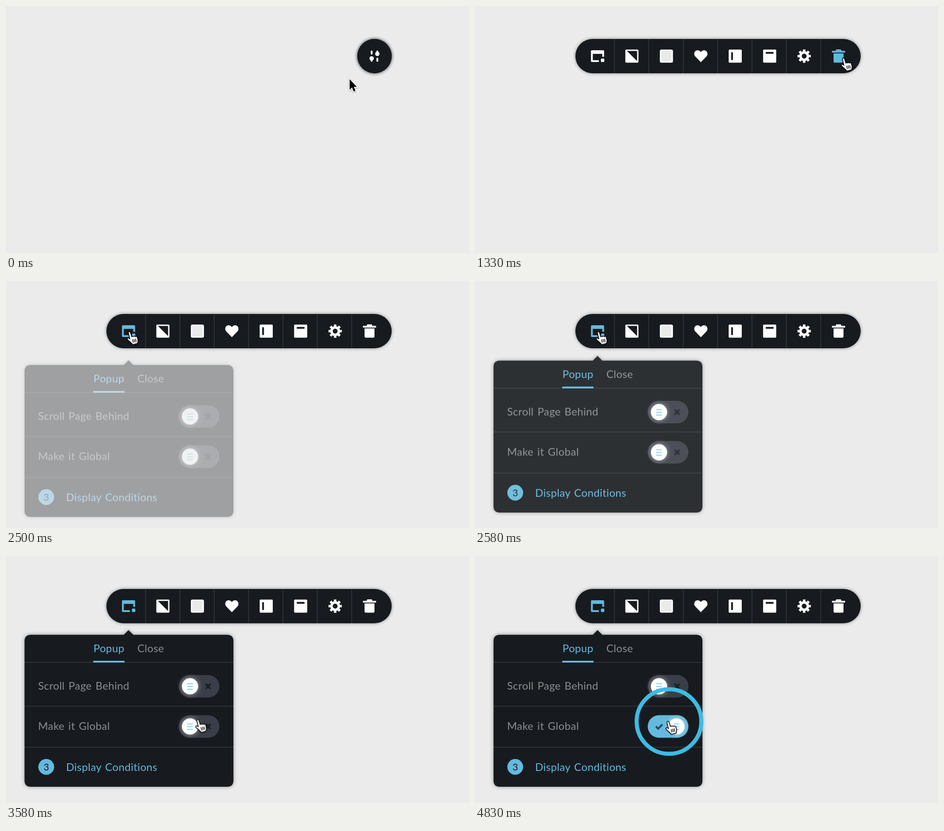
These frames come from a looping animation (1024x547 px, 5000 ms). An HTML page:

```html
<!DOCTYPE html>
<html lang="en">
<head>
<meta charset="utf-8">
<title>Popup toolbar</title>
<style>
  :root { --dark: #171b1f; --blue: #64b9de; --line: #363a3e; --grey: #8b8d8f; }
  html, body { margin: 0; width: 100%; height: 100%; overflow: hidden; background: #ebebeb; }
  .stage { position: relative; width: 1024px; height: 547px; overflow: hidden; }
  svg { position: absolute; left: 0; top: 0; overflow: visible; }
  .stage, .stage * { animation: 0s linear infinite; animation-duration: 5s; }

  /* toolbar */
  .bar, .fab {
    position: absolute; right: 171px; top: 73px; width: 76px; height: 76px;
    border-radius: 38px; background: var(--dark); box-shadow: 0 0 7px rgba(0, 0, 0, .45);
  }
  .bar { overflow: hidden; animation-name: expand; }
  .bar svg { overflow: hidden; }
  .fab { color: #fff; animation-name: fab; }
  .fab svg { animation-name: fab-hover; }
  .icon { color: #fff; fill: currentColor; }
  .pass { animation-name: pass; animation-delay: calc(var(--t) - 5s); }
  .trash { animation-name: trash; }
  .window { animation-name: window; }
  .heart { animation-name: heart; }
  .cut { fill: var(--dark); }

  @keyframes expand {
    0%, 19.15% { width: 76px; }
    19.16% { width: 495px; animation-timing-function: ease-out; }
    22.5%, 100% { width: 631px; }
  }
  @keyframes fab {
    0%, 19.15% { opacity: 1; }
    19.16% { opacity: .8; }
    21.5%, 100% { opacity: 0; }
  }
  @keyframes fab-hover { 0%, 6% { color: #fff; } 8%, 100% { color: var(--blue); } }
  @keyframes pass {
    0%, .9% { color: #fff; }
    1.5%, 2% { color: var(--blue); }
    3.2%, 100% { color: #fff; }
  }
  @keyframes trash {
    0%, 20% { color: #fff; }
    22%, 30.7% { color: var(--blue); }
    32.7%, 100% { color: #fff; }
  }
  @keyframes window { 0%, 39.4% { color: #fff; } 41%, 100% { color: var(--blue); } }
  @keyframes heart { 0%, 19.16% { opacity: .36; } 22%, 100% { opacity: 1; } }

  /* panel */
  .panel { filter: drop-shadow(0 0 4px rgba(0, 0, 0, .4)); animation-name: panel; }
  .panel text { font: 23.5px Lato, sans-serif; letter-spacing: .4px; word-spacing: 2px; fill: var(--grey); }
  .panel .on { fill: var(--blue); }
  .panel .count { font-size: 21px; letter-spacing: 0; text-anchor: middle; fill: var(--dark); }
  .rule { stroke: var(--line); stroke-width: 1.5; }
  .track { fill: #3a3e48; }
  .knob { filter: drop-shadow(0 0 6px rgba(255, 255, 255, .5)); }
  .cross { stroke: #1c2024; stroke-width: 4; }
  .check { fill: none; stroke: #2d4552; stroke-width: 4; opacity: 0; }
  .flip .track { animation-name: track; }
  .flip .knob { animation-name: knob; }
  .flip .cross { animation-name: cross; }
  .flip .check { animation-name: check; }
  .ring { fill: none; stroke: #3dbbe3; stroke-width: 9; animation-name: ring; }

  @keyframes panel {
    0%, 49.99% { opacity: 0; transform: translateY(18px); }
    50% { opacity: .36; transform: translateY(11.5px); animation-timing-function: ease-out; }
    52.5%, 100% { opacity: 1; transform: none; }
  }
  @keyframes track { 0%, 85.82% { fill: #3a3e48; } 85.83%, 100% { fill: var(--blue); } }
  @keyframes cross { 0%, 85.82% { opacity: 1; } 85.83%, 100% { opacity: 0; } }
  @keyframes knob {
    0%, 85.82% { transform: translateX(0); }
    85.83% { transform: translateX(5.5px); animation-timing-function: ease-out; }
    88.6%, 100% { transform: translateX(38.5px); }
  }
  @keyframes check { 0%, 87% { opacity: 0; } 88.6%, 100% { opacity: 1; } }
  @keyframes ring {
    0%, 91% { r: 0; animation-timing-function: ease-out; }
    96.6%, 100% { r: 71.5px; }
  }

  /* pointer */
  .px { animation-name: px; }
  .py { animation-name: py; }
  .arrow { animation-name: arrow; }
  .hand { animation-name: hand; }
  .px, .py, .arrow, .hand { filter: none; }
  .shade { filter: drop-shadow(0 1px 1.5px rgba(0, 0, 0, .35)); }

  @keyframes px {
    0%, 2% { transform: translateX(760px); animation-timing-function: cubic-bezier(.3, .18, .3, 1); }
    13.33%, 28.08% { transform: translateX(815px); animation-timing-function: cubic-bezier(.4, 0, .2, 1); }
    43.33%, 58.8% { transform: translateX(273px); animation-timing-function: cubic-bezier(.3, .18, .3, 1); }
    74.2%, 100% { transform: translateX(427px); }
  }
  @keyframes py {
    0%, 2% { transform: translateY(162px); animation-timing-function: cubic-bezier(.3, .18, .3, 1); }
    13.33%, 28.08% { transform: translateY(116px); animation-timing-function: ease-in-out; }
    35.8% { transform: translateY(134px); animation-timing-function: cubic-bezier(.4, 0, .2, 1); }
    43.33%, 58.8% { transform: translateY(113px); animation-timing-function: cubic-bezier(.3, .18, .3, 1); }
    74.2%, 100% { transform: translateY(367px); }
  }
  @keyframes arrow { 0%, 5.8% { opacity: 1; } 5.81%, 100% { opacity: 0; } }
  @keyframes hand { 0%, 5.8% { opacity: 0; } 5.81%, 100% { opacity: 1; } }
</style>
</head>
<body>
<div class="stage">
  <div class="bar">
    <svg width="631" height="76">
      <path class="rule" d="M86.5 0v76m76-76v76m76-76v76m76-76v76m76-76v76m76-76v76m76-76v76"/>
      <g transform="translate(49 38)"><g class="icon window">
        <path d="M-14.5-11q0-2 2-2h25q2 0 2 2V1.5h-4V-5h-21V9H3v4h-15.500q-2 0-2-2z"/>
        <rect x="7.500" y="5.500" width="7.500" height="7.500" rx="1.500"/>
      </g></g>
      <g transform="translate(125 38)"><g class="icon pass" style="--t:1.795s">
        <rect x="-14.5" y="-14.5" width="29" height="29" rx="2"/>
        <path class="cut" d="M-11-11.500h22.500v22.500z"/>
      </g></g>
      <g transform="translate(201.300 38)"><g class="icon pass" style="--t:1.724s">
        <rect x="-14.5" y="-14.5" width="29" height="29" rx="3.500"/>
        <rect x="-11.500" y="-11.500" width="23" height="23" rx="1.500" fill="#eaeaea"/>
      </g></g>
      <g transform="translate(277.500 38)"><g class="heart"><g class="icon pass" style="--t:1.675s">
        <path d="M0 13.500L-12.500.5C-16.500-4-14.500-12-8-13-4-13.500-1.500-11 0-9 1.500-11 4-13.500 8-13 14.500-12 16.500-4 12.500.5z"/>
      </g></g></g>
      <g transform="translate(353.500 38)"><g class="icon pass" style="--t:1.634s">
        <rect x="-14.5" y="-14.5" width="29" height="29" rx="2"/>
        <rect class="cut" x="-9" y="-9" width="4" height="18" rx="2"/>
      </g></g>
      <g transform="translate(429.700 38)"><g class="icon pass" style="--t:1.593s">
        <rect x="-14.5" y="-14.5" width="29" height="29" rx="2"/>
        <rect class="cut" x="-9" y="-9.300" width="18" height="4" rx="2"/>
      </g></g>
      <g transform="translate(506 38)"><g class="icon pass" style="--t:1.535s">
        <g fill="none" stroke="currentColor">
          <circle r="8.200" stroke-width="5.600"/>
          <circle r="12.400" stroke-width="4.600" pathLength="16" stroke-dasharray="1.1 .9" stroke-dashoffset=".55"/>
        </g>
      </g></g>
      <g transform="translate(582 38)"><g class="icon trash">
        <path d="M-11-6h22v17.500q0 3-3 3H-8q-3 0-3-3z"/>
        <rect x="-14.500" y="-11.800" width="29" height="4" rx="1"/>
        <path d="M-6-11v-2q0-2 2-2h8q2 0 2 2v2h-3v-1h-6v1z"/>
      </g></g>
    </svg>
  </div>

  <div class="fab">
    <svg width="76" height="76" fill="currentColor" stroke="currentColor" stroke-width="4" stroke-linecap="round">
      <path d="M31.700 27.500v5M31.700 43v5.500M44.300 27.500v5M44.300 43.500v5"/>
      <circle cx="31.700" cy="43" r="4.800" stroke="none"/>
      <circle cx="44.300" cy="33" r="4.800" stroke="none"/>
    </svg>
  </div>

  <svg width="1024" height="547">
    <defs>
      <g id="dial">
        <circle r="18" fill="#fff"/>
        <path d="M-6.500-5.500h13M-6.500.5h13M-6.500 6.500h13" stroke="#64b9de" stroke-width="1.700"/>
      </g>
      <rect id="slot" x="382" y="-25" width="90" height="50" rx="25"/>
      <path id="x" d="M441.500-5.500l11 11m0-11l-11 11"/>
    </defs>

    <g class="panel">
      <path fill="#171b1f" d="M55 174.500H260.500L271 164l10.500 10.500H489q14 0 14 14V497q0 14-14 14H55q-14 0-14-14V188.500q0-14 14-14z"/>
      <path class="rule" d="M41 235.500h462M41 332.500h462M41 423.500h462"/>
      <rect class="on" x="193" y="232" width="69" height="4"/>
      <text class="on" x="193.500" y="212.500">Popup</text>
      <text x="290.500" y="212.500">Close</text>
      <text x="71" y="296">Scroll Page Behind</text>
      <text x="71" y="385">Make it Global</text>
      <circle class="on" cx="89" cy="467" r="17.500"/>
      <text class="count" x="89" y="474.500">3</text>
      <text class="on" x="133" y="475.500">Display Conditions</text>

      <g transform="translate(0 288.500)">
        <use href="#slot" class="track"/>
        <use href="#x" class="cross"/>
        <g class="knob"><use href="#dial" x="407"/></g>
      </g>
      <g class="flip" transform="translate(0 377.500)">
        <use href="#slot" class="track"/>
        <use href="#x" class="cross"/>
        <path class="check" d="M400 0l5 5 9.500-9.500"/>
        <g class="knob"><use href="#dial" x="407"/></g>
      </g>
    </g>

    <circle class="ring" cx="429" cy="366.500" r="0"/>

    <g class="px"><g class="py"><g class="shade">
      <path class="arrow" d="M0 0V23.500L5.300 18.600 9 27.500 13 25.800 9.300 17H15.800z"
        stroke="#fff" stroke-width="3" paint-order="stroke"/>
      <g class="hand" transform="translate(-7 -2.500)" stroke="#000" stroke-width="1.500" stroke-linejoin="round" stroke-linecap="round">
        <path fill="#fff" d="M4.800 4.800C4 1.300 8.300.6 9.300 3.800L12 13C13 11.500 15.400 11.500 16 13 17 11.200 19.400 11.500 20 13 21.500 11.500 23.500 12 24.300 14L25.700 20C26.300 23 25 25 25.200 27.500L14.500 30.500C12 27 7 23 3.500 20 1 18 2.500 15.200 5 16L8 18z"/>
        <path fill="none" d="M14 19.500l1.500 6M17.300 18.700l1.500 6M20.600 18l1.300 6"/>
      </g>
    </g></g></g>
  </svg>
</div>

<script>
  // Drives the keyframes with a clock that holds each picture for 1/24 s.
  const LOOP = 5000, FPS = 24, ROUNDING = 5;
  const start = performance.now();
  const motions = document.getAnimations();
  motions.forEach(m => m.pause());

  function tick() {
    const time = (performance.now() - start) % LOOP;
    const step = Math.floor((time + ROUNDING) * FPS / 1000);
    const held = step * 1000 / FPS % LOOP;
    motions.forEach(m => { m.currentTime = held; });
    requestAnimationFrame(tick);
  }
  tick();
</script>
</body>
</html>
```
